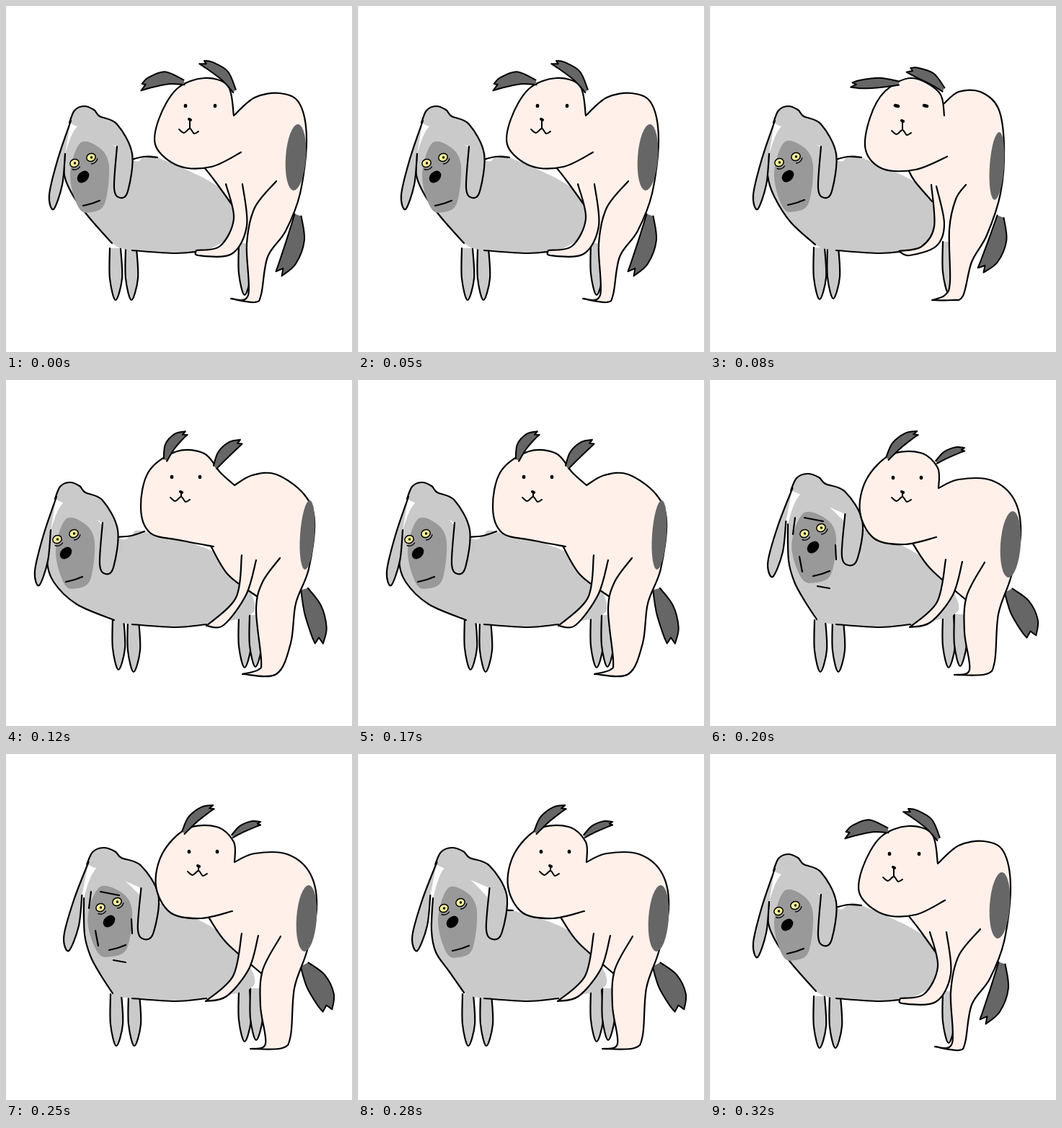
Recreate the animation shown at these times as an HTML page with a canvas. Size 480 by 480 pixels, loop 0.36 s.

```html
<!DOCTYPE html>
<html>
<head>
<meta charset="utf-8">
<style>
html, body { margin: 0; height: 100%; overflow: hidden; background: #fff; }
canvas { display: block; width: 100vmin; height: 100vmin; }
</style>
</head>
<body>
<canvas id="stage" width="480" height="480"></canvas>
<script>
const ctx = document.getElementById("stage").getContext("2d");
const GREY = "#cacaca", MID = "#999", DARK = "#666", PINK = "#fff0ea", INK = "#000";

// Outlines are smooth curves through "x y" points: "|" is a corner, ";" a new stroke, "z" closes.
const HEAD = "88 162 95 145 108 139 122 144 130 153 154 164 175 205 169 257 158 266 150 252 154 195";
const EAR = "90 159 72 212 60 262 66 282 78 248 82 205";
const PATCH = "103 190 130 197 143 222 137 274 118 286 101 280 89 235z";
const LEG = "-8 -72 -8 -30 0 0 9 -30 7 -72";
const UNDER = "175 339 235 343 278 339";

// head: top x, top y, width scale, patch scale; tufts: base, tip, width, bend
const low = {
  head: [108, 139, 1, 1], look: [95, 218],
  chest: "82 205 81 235 93 263 115 293 147 329",
  back: "210 210 192 209 174 213", rump: "318 308 300 255",
  feet: [152, 408, 174, 408, 331, 401],
  torso: "316 152 345 127 380 121 407 135 417 185 408 260 388 312 363 348 354 400 345 411 312 406 | 336 401 334 330 345 280 375 243",
  belly: "276 225 290 243 313 275", crotch: "334 320",
  arm: "305 247 316 295 297 333 264 339 | 267 346 313 344 334 305 328 247",
  face: "326 203 285 223 240 222 208 195 212 157 237 115 275 100 308 111 316 152",
  spot: [402, 210, 14, 46], eyes: [249, 290, 138, 0], nose: [255, 157, 13],
  ears: [[247, 106, 187, 114, 17, 10], [317, 118, 270, 78, 14, 8]],
  tail: [405, 290, 378, 373, 24, -8]
};
const tucked = {
  ...low, look: [96, 217],
  chest: "82 205 80 235 89 264 112 300 146 331",
  feet: [152, 407, 171, 406, 331, 399],
  torso: "325 135 345 119 375 119 400 142 408 195 403 260 384 318 363 355 351 402 335 408 308 408 | 326 401 333 382 332 310 341 268 355 248",
  belly: "275 227 284 243 308 271", crotch: "333 305",
  arm: "307 248 311 306 293 334 262 340 | 277 346 314 333 325 302 314 250",
  face: "329 209 285 227 240 226 216 200 222 155 243 118 280 100 318 120 325 152",
  spot: [398, 222, 10, 47], eyes: [259, 299, 138, 2], nose: [267, 159, 13],
  ears: [[262, 107, 195, 110, 13, 2], [324, 116, 274, 89, 15, 6]],
  tail: [403, 292, 375, 368, 24, -8]
};
const lunge = {
  head: [88, 142, 1, 1], look: [71, 221],
  chest: "60 215 57 250 66 280 98 311 150 333",
  back: "192 210 174 216 154 218", rump: "345 318 300 245",
  feet: [156, 402, 177, 405, 331, 399, 346, 398],
  torso: "317 146 342 132 375 131 413 158 428 195 420 262 402 310 395 365 375 408 328 408 | 350 402 354 388 347 318 356 280 380 247",
  belly: "284 230 308 270 348 300", crotch: "348 300",
  arm: "327 243 319 302 278 341 | 302 340 333 298 347 250",
  face: "288 231 240 222 200 212 187 177 198 127 237 99 275 102 297 128 317 146",
  spot: [418, 215, 10, 48], eyes: [230, 269, 134, 0], nose: [243, 155, 7],
  ears: [[221, 111, 251, 73, 14, -7], [290, 121, 327, 85, 15, -5]],
  tail: [414, 290, 435, 367, 25, -4]
};
const rear = {
  head: [135, 130, 1.14, 1.14], look: [131, 213],
  chest: "108 200 109 250 117 280 131 306 148 332",
  back: "210 205 206 208 200 209", rump: "345 318 300 250",
  feet: [153, 405, 178, 405, 331, 399, 347, 397],
  creases: "118 191 115 214;131 191 157 196;174 229 175 249;124 245 128 266;149 286 166 289",
  torso: "317 150 345 138 390 139 422 166 431 215 417 275 400 325 395 390 383 408 339 409 | 360 402 353 350 356 300 381 253",
  belly: "282 228 306 262 355 305", crotch: "355 305",
  arm: "327 249 315 308 277 343 | 306 336 337 298 350 252",
  face: "314 218 270 228 228 220 208 183 217 138 250 104 292 101 316 122 317 150",
  spot: [417, 228, 14, 46], eyes: [254, 293, 135, 0], nose: [267, 155, 7],
  ears: [[246, 109, 289, 73, 13, -6], [314, 114, 354, 96, 10, -4]],
  tail: [414, 292, 447, 357, 30, -4]
};
const turned = {
  ...rear, head: [130, 130, 1.14, 1], look: [119, 214], creases: "",
  chest: "104 200 102 245 108 275 126 301 147 331",
  back: "215 217 206 217 200 219"
};
const timeline = [[80, low], [120, tucked], [200, lunge], [280, rear], [320, turned], [360, low]];

const toPoints = text => {
  const nums = text.match(/-?\d+/g).map(Number);
  return nums.flatMap((x, i) => i % 2 ? [] : [[x, nums[i + 1]]]);
};

function addCurve(path, text, map) {
  const closed = text.endsWith("z");
  let last;
  for (const run of text.split("|")) {
    const pts = toPoints(run).map(([x, y]) => map(x, y));
    if (last) pts.unshift(last);
    else path.moveTo(...pts[0]);
    const n = pts.length;
    const at = i => pts[closed ? (i + n) % n : Math.max(0, Math.min(n - 1, i))];
    for (let i = 0; i < (closed ? n : n - 1); i++) {
      const [a, b, c, d] = [at(i - 1), at(i), at(i + 1), at(i + 2)];
      path.bezierCurveTo(b[0] + (c[0] - a[0]) / 6, b[1] + (c[1] - a[1]) / 6,
        c[0] - (d[0] - b[0]) / 6, c[1] - (d[1] - b[1]) / 6, ...c);
    }
    last = pts[n - 1];
  }
}

function paint(path, fill, width) {
  if (fill) { ctx.fillStyle = fill; ctx.fill(path); }
  if (width) { ctx.lineWidth = width; ctx.stroke(path); }
}

function draw(text, fill, width = 2.2, map = (x, y) => [x, y]) {
  const path = new Path2D();
  text.split(";").forEach(part => addCurve(path, part, map));
  paint(path, fill, width);
}

function oval(x, y, rx, ry, turn, fill, width, from = 0, to = 2 * Math.PI) {
  const path = new Path2D();
  path.ellipse(x, y, rx, ry, turn, from, to);
  paint(path, fill, width);
}

const shift = (dx, dy) => (x, y) => [x + dx, y + dy];

// Shaggy ear or tail: percent along the axis, percent across the width.
function tuft([x1, y1, x2, y2, width, bend]) {
  const dx = x2 - x1, dy = y2 - y1, len = Math.hypot(dx, dy);
  draw("0 -20 35 -50 75 -50 100 -20 | 88 0 | 96 25 | 80 40 40 50 0 20", DARK, 2, (along, across) => {
    const u = along / 100, v = width * across / 100 + bend * 4 * u * (1 - u);
    return [x1 + u * dx - v * dy / len, y1 + u * dy + v * dx / len];
  });
}

function drawGreyDog(p) {
  const [hx, hy, wide, patchWide] = p.head, [ex, ey] = p.look;
  const onHead = (x, y) => [hx + (x - 108) * wide, y + hy - 139];
  for (let i = 0; i < p.feet.length; i += 2) draw(LEG, GREY, 2.2, shift(p.feet[i], p.feet[i + 1]));
  draw(`${p.chest} ${UNDER} ${p.rump} ${p.back} ${hx} ${hy + 25}z`, GREY, 0);
  draw(`${p.chest};${UNDER};${p.back}`);
  draw(HEAD, GREY, 2.2, onHead);
  draw(EAR, GREY, 2.2, onHead);
  draw(PATCH, MID, 0, (x, y) => [hx + (x - 108) * patchWide, y + ey - 218]);
  if (p.creases) draw(p.creases);
  for (const [x, y, from] of [[ex, ey, 0.6], [ex + 23, ey - 8, 0.2]]) {
    oval(x, y, 6.3, 5.4, -0.4, "#f5f09a", 1.5);
    oval(x + 0.5, y, 1.7, 1.7, 0, INK, 0);
    oval(x, y, 9, 9, 0, null, 1.4, from, from + 1.3);
  }
  oval(ex + 12, ey + 19, 9.5, 7, -0.8, INK, 0);
  draw("12 59 24 56 35 52", null, 2.2, shift(ex, ey));
}

function drawPinkDog(p) {
  const torso = toPoints(p.torso);
  tuft(p.tail);
  draw(`${p.belly} | ${p.crotch} | ${torso.at(-1).join(" ")} | ${torso[0].join(" ")}`, PINK, 0);
  draw(p.torso, PINK);
  oval(...p.spot, 0.07, DARK, 0);
  draw(p.belly);
  draw(p.arm, PINK);
  draw(p.face, PINK);
  p.ears.forEach(tuft);
  const [left, right, y, dash] = p.eyes, [nx, ny, drop] = p.nose;
  for (const x of [left, right]) draw(`${x - dash} ${y} ${x + dash} ${y + 1}`, null, 4.6);
  draw("-1 0 1 1", null, 4, shift(nx, ny));
  draw(`0 0 0 ${drop}`, null, 2, shift(nx, ny));
  draw("-15 1 -8 6 0 0 6 7 12 4", null, 2, shift(nx, ny + drop));
}

function frame(now) {
  const t = now % 360;
  const pose = timeline.find(([end]) => t < end)[1];
  ctx.fillStyle = "#fff";
  ctx.fillRect(0, 0, 480, 480);
  ctx.strokeStyle = INK;
  ctx.lineCap = ctx.lineJoin = "round";
  drawGreyDog(pose);
  drawPinkDog(pose);
}

const start = performance.now();
function tick() {
  frame(performance.now() - start);
  requestAnimationFrame(tick);
}
tick();
</script>
</body>
</html>
```
